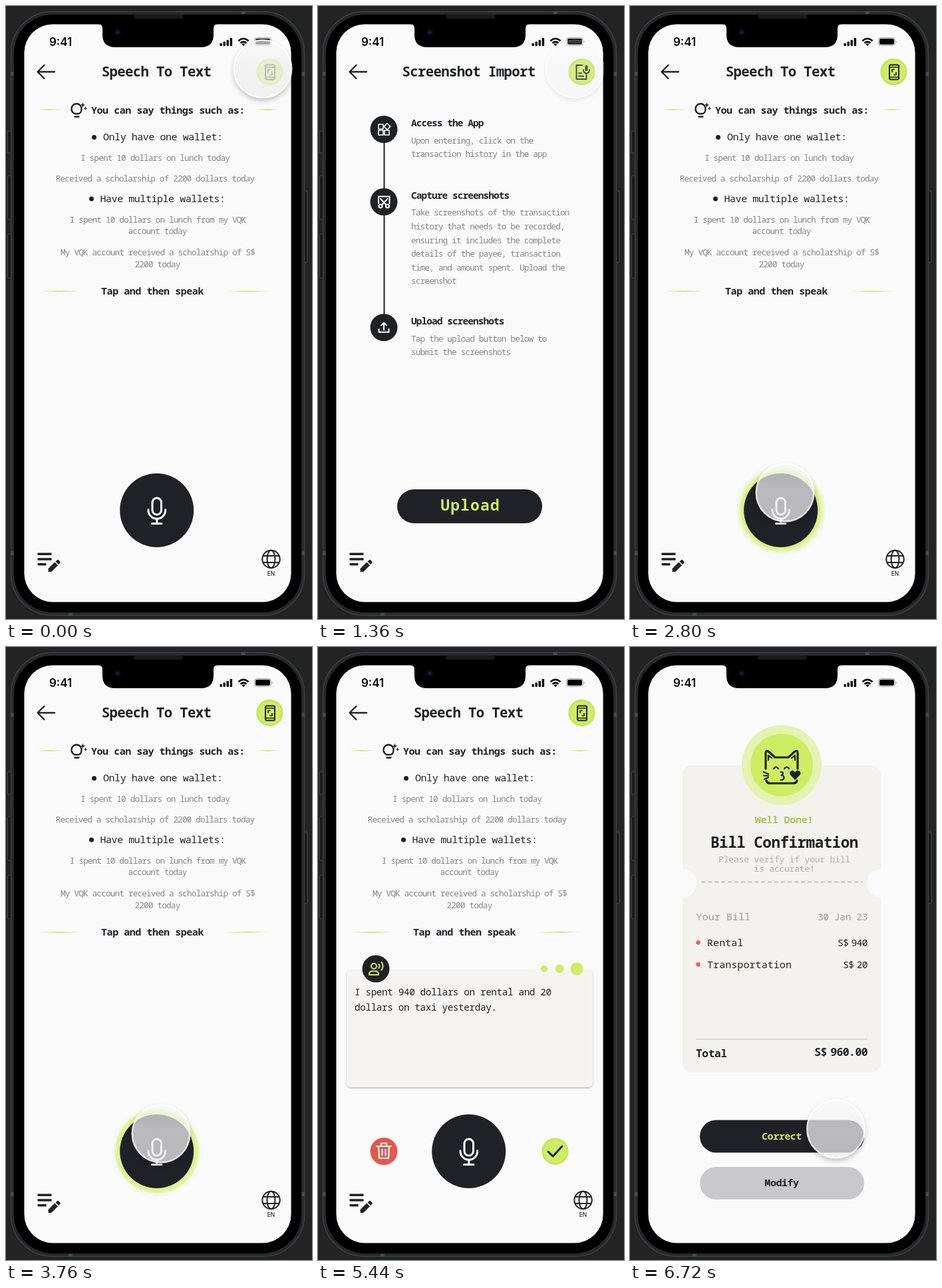
Recreate the animation shown at these times as an HTML page. Size 460x922 px, loop 6800 ms.

```html
<!DOCTYPE html>
<html lang="en">
<head>
<meta charset="utf-8">
<title>Voice bookkeeping app</title>
<style>
  html, body { margin: 0; width: 100%; height: 100%; overflow: hidden; background: #232323; }
  svg { display: block; width: 100%; height: 100%; }
  text { font-family: "Noto Sans Mono", "DejaVu Sans Mono", monospace; fill: #202127; white-space: pre; }
  .ui { font-family: Inter, "Liberation Sans", sans-serif; fill: #000; }
  .mid { text-anchor: middle; }
  .end { text-anchor: end; }
  .bold { font-weight: 700; }
  .title { font-size: 20.6px; font-weight: 600; letter-spacing: -.6px; }
  .body { font-size: 15px; letter-spacing: -.45px; }
  .small { font-size: 12.8px; font-weight: 300; letter-spacing: -.89px; fill: #85858a; }
  .step { font-size: 14.4px; font-weight: 600; letter-spacing: -.88px; }
  .said { font-size: 14.4px; letter-spacing: -.42px; }
  .note { font-size: 13.2px; font-weight: 300; letter-spacing: -.3px; fill: #b0b0ac; }
  .row { font-size: 15px; letter-spacing: .07px; }
  .price { font-size: 14.6px; letter-spacing: -.6px; word-spacing: -4px; }
  .pale { fill: #9c9c99; }
  .ink { fill: #202127; }
  .lime { fill: #cdee63; }
  .line { fill: none; stroke: #202127; stroke-width: 2; stroke-linecap: round; stroke-linejoin: round; }
  .white { stroke: #fff; }
  .green { stroke: #cdee63; }

  .anim { animation: 6.8s linear infinite; }
  .strip { animation-name: strip; }
  .speech-head { animation-name: speech-head; }
  .import-head { animation-name: import-head; }
  .glow { animation-name: glow; }
  .ring { animation-name: ring; transform-box: fill-box; transform-origin: center; }
  .result { animation-name: result; }
  .recorder { animation-name: recorder; }
  .bill { animation-name: bill; }
  .tap-switch { animation-name: tap-switch; }
  .tap-mic { animation-name: tap-mic; }
  .tap-check { animation-name: tap-check; }
  .tap-correct { animation-name: tap-correct; }

  @keyframes strip {
    0% { transform: none; }
    1% { transform: none; animation-timing-function: cubic-bezier(.2, .7, .3, 1); }
    10.6%, 21.8% { transform: translateX(-402px); animation-timing-function: cubic-bezier(.3, .5, .5, 1); }
    24.7%, 26.9% { transform: translateX(-61px); }
    27.05% { transform: translateX(-9px); }
    28.2%, 100% { transform: none; }
  }
  @keyframes speech-head {
    0%, 1% { opacity: 1; }
    9%, 21.8% { opacity: 0; }
    24.7%, 26.9% { opacity: .88; }
    28.2%, 100% { opacity: 1; }
  }
  @keyframes import-head {
    0%, 1% { opacity: 0; }
    9%, 21.8% { opacity: 1; }
    24.7%, 26.9% { opacity: .16; }
    28.2%, 100% { opacity: 0; }
  }
  @keyframes glow {
    0%, 34% { opacity: 0; }
    40%, 51.8% { opacity: 1; }
    61%, 100% { opacity: 0; }
  }
  @keyframes ring {
    0%, 51.8% { opacity: 0; transform: scale(.84); }
    61.2% { opacity: 1; transform: scale(1.03); }
    66% { opacity: 1; transform: scale(.95); }
    70.5%, 72.4% { opacity: 1; transform: none; }
    78%, 100% { opacity: 0; transform: scale(.84); }
  }
  @keyframes result {
    0%, 73% { opacity: 0; }
    79.4%, 100% { opacity: 1; }
  }
  @keyframes recorder {
    0%, 87% { opacity: 1; }
    88.2% { opacity: .87; }
    91.8%, 100% { opacity: 0; }
  }
  @keyframes bill {
    0%, 87% { opacity: 0; }
    88.2% { opacity: .13; }
    91.8%, 100% { opacity: 1; }
  }
  @keyframes tap-switch {
    0%, .9% { opacity: 1; }
    5.9%, 18.8% { opacity: 0; }
    20% { opacity: .3; }
    22.4%, 26.9% { opacity: 1; }
    28.2%, 100% { opacity: 0; }
  }
  @keyframes tap-mic {
    0%, 30.6% { opacity: 0; }
    35.3%, 72.3% { opacity: 1; }
    76%, 100% { opacity: 0; }
  }
  @keyframes tap-check {
    0%, 82.2% { opacity: 0; }
    86%, 88.8% { opacity: 1; }
    91.8%, 100% { opacity: 0; }
  }
  @keyframes tap-correct {
    0%, 93% { opacity: 0; }
    97.6%, 100% { opacity: 1; }
  }
</style>
</head>
<body>
<svg viewBox="0 0 460 922">
  <defs>
    <clipPath id="screen"><rect x="27.400" y="27.400" width="401.200" height="869" rx="43"/></clipPath>
    <linearGradient id="fade">
      <stop offset="0" stop-color="#d3e878" stop-opacity="0"/>
      <stop offset=".5" stop-color="#d3e878"/>
      <stop offset="1" stop-color="#d3e878" stop-opacity="0"/>
    </linearGradient>
    <linearGradient id="glass" x2="0" y2="1">
      <stop offset="0" stop-color="#f8f8f8" stop-opacity=".66"/>
      <stop offset=".45" stop-color="#f0eff0" stop-opacity=".74"/>
      <stop offset="1" stop-color="#eeedee" stop-opacity=".74"/>
    </linearGradient>
    <filter id="soft" x="-30%" y="-30%" width="160%" height="160%"><feGaussianBlur stdDeviation="4.5"/></filter>
    <filter id="drop" x="-20%" y="-20%" width="140%" height="150%">
      <feDropShadow dx="0" dy="1.5" stdDeviation="1.2" flood-opacity=".25"/>
    </filter>
    <mask id="rim">
      <rect x="-70" y="-70" width="140" height="140" fill="#fff"/>
      <circle r="44"/>
    </mask>
    <g id="tap">
      <circle cy="4" r="43" fill="#000" opacity=".28" filter="url(#soft)" mask="url(#rim)"/>
      <circle r="43" fill="url(#glass)"/>
      <circle r="43.3" fill="none" stroke="#fff" stroke-width="2.4" stroke-opacity=".85"/>
    </g>
    <g id="badge">
      <circle r="20" fill="#cdee63"/>
      <circle r="18.8" fill="none" stroke="#bfdc5c" stroke-width="2.4" stroke-opacity=".6"/>
    </g>
    <circle id="disc" r="20.5"/>
  </defs>

  <rect width="460" height="922" fill="#232323"/>
  <g fill="#171717" stroke="#4c4e52">
    <rect x="2.5" y="188" width="6" height="33"/>
    <rect x="2.5" y="255" width="6" height="66" rx="2"/>
    <rect x="2.5" y="343" width="6" height="66" rx="2"/>
    <rect x="447" y="278" width="6" height="108" rx="2"/>
  </g>
  <rect x="7.500" y="8.500" width="441" height="908" rx="62" fill="#25282d" stroke="#3d4149" stroke-width="1.500"/>
  <path d="M7 102h4M7 823h4M445 102h4M445 823h4M357 8v4M97 913v4" stroke="#484c53" stroke-width="6"/>
  <rect x="12" y="13" width="432" height="899" rx="58"/>
  <rect x="192" y="13" width="74" height="6" rx="3" fill="#191919"/>

  <g clip-path="url(#screen)">
    <rect x="27" y="27" width="402" height="870" fill="#fafafa"/>

    <g class="anim recorder">
      <g class="anim strip">
        <g fill="url(#fade)">
          <rect x="48" y="155" width="36" height="2"/>
          <rect x="376" y="155" width="36" height="2"/>
          <rect x="48" y="428" width="66" height="2"/>
          <rect x="329" y="428" width="66" height="2"/>
        </g>
        <path class="line" style="stroke-width:2.300" d="M103 162q-5-3-4.500-8a7.500 7.500 0 0 1 15 1q0 5-4 7zM103.500 166.500h6"/>
        <path class="ink" d="M115.500 145l1 3 3 1-3 1-1 3-1-3-3-1 3-1zM119.500 151l.8 2.200 2.200.8-2.200.8-.8 2.200-.8-2.200-2.200-.8 2.200-.8z"/>
        <text class="body bold" x="128" y="161.500">You can say things such as:</text>
        <circle class="ink" cx="132.500" cy="197.500" r="3.500"/>
        <text class="body" x="146" y="202">Only have one wallet:</text>
        <text class="small mid" x="224" y="233">I spent 10 dollars on lunch today</text>
        <text class="small mid" x="224" y="263.500">Received a scholarship of 2200 dollars today</text>
        <circle class="ink" cx="128.500" cy="290" r="3.500"/>
        <text class="body" x="141.500" y="294.500">Have multiple wallets:</text>
        <text class="small mid" x="228" y="325.500">I spent 10 dollars on lunch from my VQK</text>
        <text class="small mid" x="227.500" y="343">account today</text>
        <text class="small mid" x="228" y="375">My VQK account received a scholarship of S$</text>
        <text class="small mid" x="227.500" y="392.500">2200 today</text>
        <text class="body bold mid" x="220" y="433.500">Tap and then speak</text>

        <circle class="lime anim glow" cx="227" cy="758.500" r="61" filter="url(#soft)"/>
        <circle class="lime anim ring" cx="227" cy="758.500" r="69"/>
        <circle class="ink" cx="226.700" cy="758.500" r="55.500"/>
        <g class="line white" style="stroke-width:3">
          <rect x="220" y="740" width="13.500" height="25" rx="6.700"/>
          <path d="M214 757.500v1a12.800 12.800 0 0 0 25.600 0v-1M226.800 771.500v7M219.500 778.500h14.500"/>
        </g>

        <g class="line">
          <circle cx="398.500" cy="832" r="13.200"/>
          <ellipse cx="398.500" cy="832" rx="6" ry="13.200"/>
          <path d="M387 827h23M387 837h23"/>
        </g>
        <text class="ui mid" x="398.500" y="857" font-size="8.500">EN</text>

        <g transform="translate(402)">
          <path d="M99.500 185v298" stroke="#202127" stroke-width="2"/>
          <use href="#disc" x="99" y="185.500" class="ink"/>
          <use href="#disc" x="99" y="294.500" class="ink"/>
          <use href="#disc" x="99" y="483.500" class="ink"/>
          <path class="line white" style="stroke-width:1.600" d="M91 178h7v7h-7zM91 187h7v7h-7zM100 187h7v7h-7zM104 176.500l4.800 4.800-4.800 4.800-4.800-4.800z"/>
          <g class="line white">
            <path d="M91 297v-10.500h16.500v10.500M94 290l8.500 9M104.500 290l-8.500 9"/>
            <circle cx="94" cy="301" r="2.600"/><circle cx="104.500" cy="301" r="2.600"/>
          </g>
          <path class="line white" d="M99 487v-10M95 480.500l4-4 4 4M91.500 486v4.500h15v-4.500"/>
          <text class="step" x="140" y="180.500">Access the App</text>
          <text class="small" x="140" y="206.500">Upon entering, click on the</text>
          <text class="small" x="140" y="227">transaction history in the app</text>
          <text class="step" x="140" y="289.500">Capture screenshots</text>
          <text class="small" x="140" y="315">Take screenshots of the transaction</text>
          <text class="small" x="140" y="335.500">history that needs to be recorded,</text>
          <text class="small" x="140" y="356.500">ensuring it includes the complete</text>
          <text class="small" x="140" y="377">details of the payee, transaction</text>
          <text class="small" x="140" y="397.500">time, and amount spent. Upload the</text>
          <text class="small" x="140" y="418">screenshot</text>
          <text class="step" x="140" y="478.500">Upload screenshots</text>
          <text class="small" x="140" y="504.500">Tap the upload button below to</text>
          <text class="small" x="140" y="525">submit the screenshots</text>
          <rect class="ink" x="119" y="727" width="218" height="51" rx="25.500"/>
          <text class="lime mid" x="229" y="759" font-size="23" font-weight="600" letter-spacing="1.100">Upload</text>
        </g>
      </g>

      <path class="line" style="stroke-width:2.300" d="M73 99H48M57.500 89L47.500 99l10 10"/>
      <path d="M47.500 824.300h21M47.500 832h21M47.500 839.800h13" stroke="#202127" stroke-width="3.500"/>
      <path class="ink" d="M63.500 851v-4.800l9.800-9.600 4.700 4.700-9.700 9.700zM74.500 835.500l2.400-2.300q1-.8 2 0l2.500 2.500q.8 1 0 2l-2.300 2.400z"/>

      <g class="anim speech-head">
        <text class="title mid" x="226" y="106">Speech To Text</text>
        <use href="#badge" x="396.500" y="99"/>
        <rect class="line" x="390" y="88.500" width="14" height="22" rx="2"/>
        <path class="line" style="stroke-width:1.700" d="M390 92h14M390 107h14M394 99v-3.500h3M400 100v3.500h-3"/>
      </g>
      <g class="anim import-head">
        <text class="title mid" x="226.500" y="106">Screenshot Import</text>
        <use href="#badge" x="396.500" y="99"/>
        <path class="line" d="M397 89h-8.500v21h15v-6M392 101h4M392 105.500h7M399 96q0 5 4.500 5t4.500-5M403.500 101v4"/>
        <rect class="ink" x="401.500" y="89" width="4" height="9" rx="2"/>
      </g>

      <g class="anim result">
        <rect x="43" y="485" width="370" height="177" rx="6" fill="#f5f4f0" filter="url(#drop)"/>
        <use href="#disc" x="87" y="484" class="ink"/>
        <g class="line green">
          <circle cx="84" cy="480" r="4"/>
          <path d="M77 493v-1q0-4.500 5-4.500h4q5 0 5 4.500v1zM91.500 477q2 3 0 6M95.500 474q4 6 0 12"/>
        </g>
        <g class="lime">
          <circle cx="340" cy="484" r="5"/><circle cx="363" cy="484" r="6.500"/><circle cx="389" cy="484" r="9.500"/>
        </g>
        <text class="said" x="55" y="524">I spent 940 dollars on rental and 20</text>
        <text class="said" x="55" y="546.500">dollars on taxi yesterday.</text>
        <use href="#disc" x="99" y="758.500" fill="#e4574a"/>
        <path class="line white" style="stroke-width:2.200" d="M88 751h22M95 750.500v-4h8v4M91 751.500l1 17.500h14l1-17.500M96.500 756v8.500M101.500 756v8.500"/>
        <use href="#badge" x="356.500" y="758.500"/>
        <path class="line" style="stroke-width:3" d="M346 759l7 7 14-15"/>
      </g>
    </g>

    <g class="anim bill">
      <rect x="79" y="178" width="298" height="462" rx="14" fill="#f3f2ec"/>
      <g fill="#fafafa"><circle cx="79" cy="355" r="21.500"/><circle cx="377" cy="355" r="21.500"/></g>
      <path d="M107 353.500h243" stroke="#c3c3be" stroke-width="2" stroke-dasharray="6 4"/>
      <circle cx="228" cy="177.500" r="60" fill="#e4f2b2"/>
      <circle class="lime" cx="228" cy="177.500" r="47"/>
      <g class="line" style="stroke-width:3.200">
        <path d="M204 183v-24q0-4 4-2l10 9h20l10-9q4-2 4 2v24M205 201q1 4 6 4h34q5 0 6-4"/>
        <path style="stroke-width:2.200" d="M208 170v-7l5 4M248 170v-7l-5 4M216 183q3.500-5 7 0M232 183q3.500-5 7 0M226.500 188q5 0 3 3.500-1 1.500-2 1.500 4 0 4 3.500t-5 3.500M201 188l7 3M201 193.500h7M202 199l6-3"/>
      </g>
      <path class="ink" d="M248 200l-6.500-7q-3-4 .5-6.500 4-2 6 2 2.500-4.500 6.500-2 3.500 3 .5 6.500z"/>
      <text class="body bold mid" x="231.500" y="264.500" style="fill:#aac45a;letter-spacing:-.250px">Well Done!</text>
      <text class="bold mid" x="232" y="302" font-size="22.500" letter-spacing="-.450">Bill Confirmation</text>
      <text class="note mid" x="232" y="323.500">Please verify if your bill</text>
      <text class="note mid" x="232" y="338">is accurate!</text>
      <text class="row pale" x="99.500" y="411">Your Bill</text>
      <text class="end pale" x="357" y="411" font-size="14.500" letter-spacing="-.370">30 Jan 23</text>
      <g fill="#e2655a"><circle cx="102.500" cy="444.500" r="3.300"/><circle cx="102.500" cy="477.500" r="3.300"/></g>
      <text class="row" x="116" y="450">Rental</text>
      <text class="price end" x="357" y="450">S$ 940</text>
      <text class="row" x="116" y="482.500">Transportation</text>
      <text class="price end" x="357" y="482.500">S$ 20</text>
      <path d="M99 590h258" stroke="#cfcec9" stroke-width="1.500"/>
      <text class="bold" x="99" y="616.500" font-size="16" letter-spacing="-.240">Total</text>
      <text class="price end bold" x="357" y="614.500" style="font-size:16.500px">S$ 960.00</text>
      <rect class="ink" x="105" y="711.500" width="247" height="49" rx="24.500"/>
      <text class="lime body bold mid" x="228" y="740.500" style="fill:#cdee63">Correct</text>
      <rect x="105" y="782" width="247" height="49" rx="24.500" fill="#c9c9cb"/>
      <text class="body bold mid" x="228" y="811">Modify</text>
    </g>
  </g>

  <path d="M138 27q7 0 7 7v9q0 19 19 19h129q19 0 19-19v-9q0-7 7-7z"/>
  <circle cx="168" cy="39.500" r="5" fill="#0b0b1c"/>
  <circle cx="168" cy="39.500" r="2" fill="#1c2258"/>

  <text class="ui" x="65" y="60" font-size="17" font-weight="600">9:41</text>
  <rect x="321.500" y="56" width="3.400" height="4" rx="1"/>
  <rect x="326.500" y="53.500" width="3.400" height="6.500" rx="1"/>
  <rect x="331.500" y="51" width="3.400" height="9" rx="1"/>
  <rect x="336.700" y="48" width="3.400" height="12" rx="1"/>
  <g fill="none" stroke="#000" stroke-width="2.600">
    <path d="M349.500 52.500q7.500-7 15 0M352.500 55.800q4.500-4 9 0"/>
  </g>
  <path d="M354.500 57.500q2.500-2 5 0l-2.500 2.700z"/>
  <rect x="373.500" y="47.500" width="25" height="12" rx="3.800" fill="none" stroke="#999"/>
  <rect x="375" y="49" width="22" height="9" rx="2.300"/>
  <path d="M400 51.500q1.600 2 0 4z" fill="#999"/>

  <g class="anim tap-switch"><use href="#tap" x="386" y="94.500"/></g>
  <g class="anim tap-mic"><use href="#tap" x="233" y="732"/></g>
  <g class="anim tap-check"><use href="#tap" x="347" y="754.500"/></g>
  <g class="anim tap-correct"><use href="#tap" x="309.500" y="725"/></g>
</svg>
</body>
</html>
```
